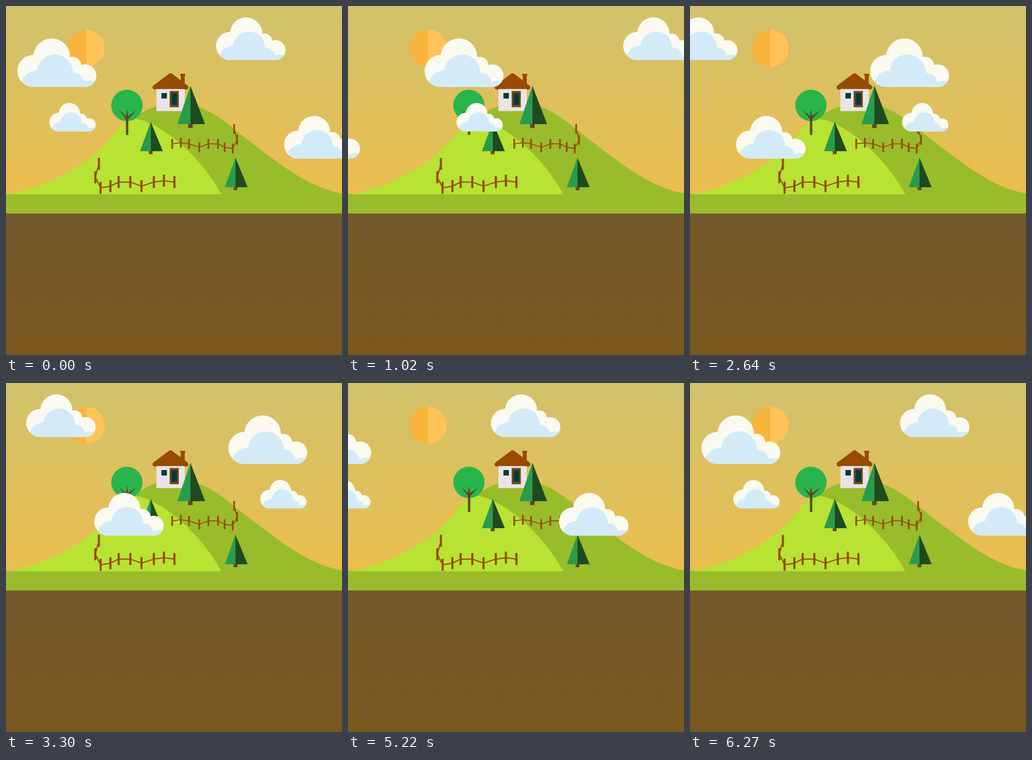
These frames come from a looping animation (735 by 762 pixels, 6300 ms). An HTML page:

```html
<!DOCTYPE html>
<html lang="en">
<head>
<meta charset="utf-8">
<title>Hill with drifting clouds</title>
<style>
html, body { margin: 0; width: 100%; height: 100%; overflow: hidden; }
svg { display: block; width: 100vw; height: 100vh; }
</style>
</head>
<body>
<svg viewBox="0 0 735 762" xmlns="http://www.w3.org/2000/svg">
  <defs>
    <linearGradient id="sky" x1="0" y1="0" x2="0" y2="1">
      <stop offset="0" stop-color="#d1c26c"/><stop offset="1" stop-color="#ebbe4e"/>
    </linearGradient>
    <linearGradient id="soil" x1="0" y1="0" x2="0" y2="1">
      <stop offset="0" stop-color="#73582b"/><stop offset="1" stop-color="#7a581f"/>
    </linearGradient>

    <path id="outline"/>
    <clipPath id="inside"><use href="#outline"/></clipPath>
    <g id="cloud">
      <use href="#outline" fill="#fbfaf0"/>
      <path id="shade" fill="#d3ebf8" clip-path="url(#inside)"/>
    </g>

    <g id="pine">
      <path d="M-5 83h10v9.5h-10z" fill="#634522"/>
      <path d="M0 0L-28.3 84H0z" fill="#279c4c"/>
      <path d="M0 0L32.2 84H0z" fill="#1e4a1e"/>
    </g>

    <g id="fence" fill="#964b0a">
      <polyline id="rail" fill="none" stroke="#964b0a" stroke-width="2.5" stroke-linejoin="round"
        points="0,0 23,-3 45,0 72,9 96.4,0 122,0 140,9 161.5,12.5 173,-10.5 165.2,-39.8"/>
    </g>
  </defs>

  <rect width="735" height="412" fill="url(#sky)"/>
  <circle cx="175.5" cy="92.5" r="40.6" fill="#ffc358"/>
  <path d="M175.2 51.9a40.6 40.6 0 0 0 0 81.2z" fill="#f9b43b"/>

  <path d="M0 410.5H270V253C300 227 335 212 372 212C440 212 480 255 530 293C600 347 665 398 735 409V454H0z" fill="#99bc2a"/>
  <path d="M8 411C90 392 150 362 195 322C235 287 255 246 280 246C340 252 430 333 471 411z" fill="#b8e332"/>
  <rect y="453" width="735" height="309" fill="url(#soil)"/>

  <g fill="#964b00">
    <path d="M382.3 150H391V172H382.3zM381 148H392V152H381z"/>
    <path d="M325.5 177.5L360 151.8L394 177.5z" stroke="#964b00" stroke-width="10" stroke-linejoin="round"/>
    <rect x="329" y="181.3" width="62" height="48.2" fill="#e9e4e6"/>
    <rect x="358" y="185.5" width="20" height="35.5" fill="#7a4818"/>
    <path d="M362 190H374.5V216H362zM340 190H352V202H340z" fill="#043c3b"/>
  </g>

  <circle cx="264.5" cy="217" r="34.3" fill="#2ab54c"/>
  <path d="M262.4 281.5V247L246.5 226L262.6 240.5L264.8 223.5L267.1 240.5L286.5 226.5L267.5 247V281.5z" fill="#634522"/>

  <use href="#pine" transform="translate(403.3 174)"/>
  <use href="#pine" transform="translate(316.5 252.7) scale(.825 .766)"/>
  <use href="#pine" transform="translate(502 331.3) scale(.825 .766)"/>
  <use href="#fence" transform="translate(368.4 384.4) scale(-1 1)"/>
  <use href="#fence" transform="translate(363.6 301) scale(.82)"/>
  <g id="clouds"></g>
</svg>
<script>
const LOOP = 6300, STEP = 30, SPAN = 876.5;
const TRAVEL = LOOP - STEP;   // last step lands on the starting pose
const $ = id => document.getElementById(id);

function add(parent, tag, attrs) {
  const node = document.createElementNS('http://www.w3.org/2000/svg', tag);
  for (const key in attrs) node.setAttribute(key, attrs[key]);
  return parent.appendChild(node);
}

const disc = (x, y, r) =>
  `M${x - r} ${y}a${r} ${r} 0 1 1 ${2 * r} 0a${r} ${r} 0 1 1 ${-2 * r} 0z`;

// Cloud shapes stand on y = 0 and start at x = 0.
$('outline').setAttribute('d', disc(35, -35, 35) + disc(75, -66, 40) + disc(120, -46, 20) +
  disc(148, -24.7, 24.7) + 'M35 -45h113v45h-113z');
$('shade').setAttribute('d', disc(43, 0, 36) + disc(82, -31.5, 39.5) + disc(122, -6, 25) +
  disc(159, 11, 25) + 'M60 -20h60v20h-60z');

// One post stands on every corner of the rail.
for (const { x, y } of $('rail').points)
  add($('fence'), 'rect', { x: x - 2.3, y: y - 13.4, width: 4.6, height: 26.8, rx: 1.7 });

function makeCloud(x, y, scale) {
  const copies = [0, -SPAN].map(shift => ({ shift, node: add($('clouds'), 'use', { href: '#cloud' }) }));
  return drift => {
    const left = (x + drift) % SPAN;
    for (const { shift, node } of copies)
      node.setAttribute('transform', `translate(${left + shift} ${y}) scale(${scale})`);
  };
}

const clouds = [
  makeCloud(25, 176.8, 1),
  makeCloud(459.4, 118, 0.88),
  makeCloud(94.8, 274, 0.587),
  makeCloud(608.2, 333.3, 0.88)
];

function tick() {
  const time = Math.floor(performance.now() % LOOP / STEP) * STEP;
  for (const move of clouds) move(SPAN * time / TRAVEL);
  requestAnimationFrame(tick);
}
tick();
</script>
</body>
</html>
```
